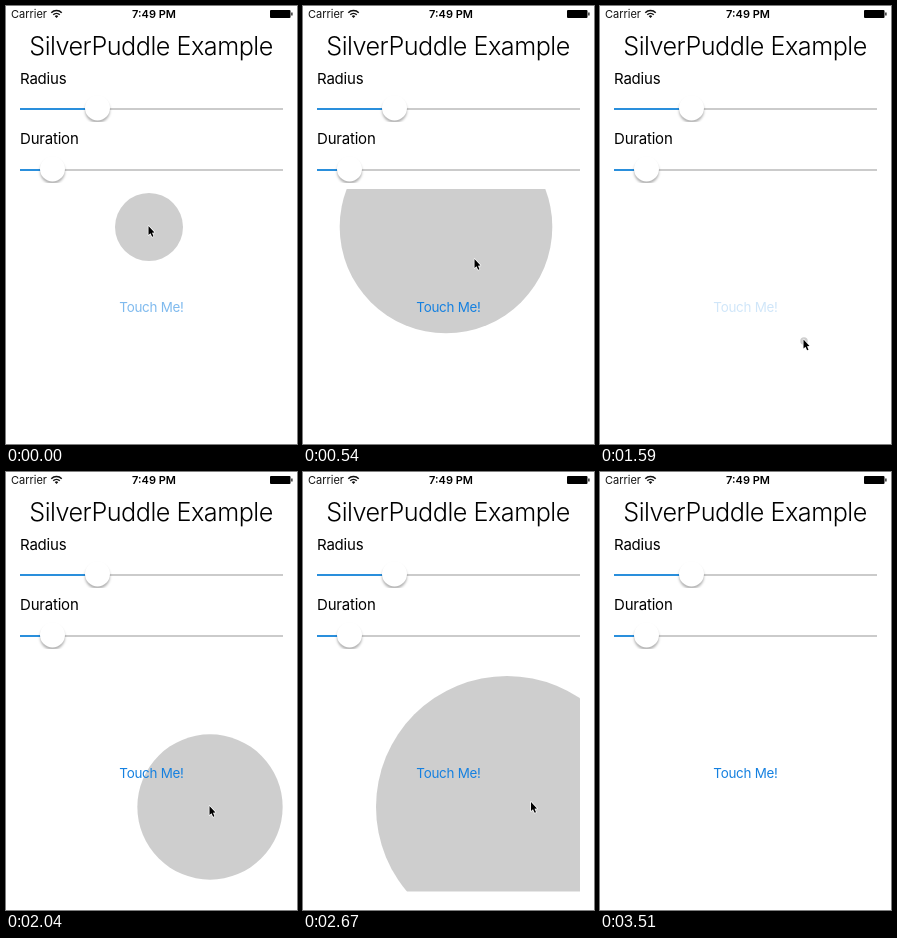
An HTML page with a canvas for the animation above (4.08 s loop, 291 px wide and 438 px high).

```html
<!DOCTYPE html>
<html lang="en">
<head>
<meta charset="utf-8">
<title>Ripple demo</title>
<style>
  html, body { margin: 0; width: 100%; height: 100%; overflow: hidden; background: #fff; }
  canvas { display: block; width: 291px; height: 438px; }
</style>
</head>
<body>
<canvas id="stage"></canvas>
<script>
const W = 291, H = 438, LOOP = 4080;
const canvas = document.getElementById('stage');
const ctx = canvas.getContext('2d');
const dpr = window.devicePixelRatio || 1;
canvas.width = W * dpr;
canvas.height = H * dpr;

const FONT = 'Inter, "Liberation Sans", sans-serif';
const GROW = 1070, MAX_R = 131;
const ripples = [
  { x: 143, y: 221, start: -208, fade: 835, end: 1025 },
  { x: 204, y: 335, start: 1568, fade: 2668, end: 2865 }
];

// time, x, y of the pointer tip
const pointerPath = [
  [0, 142.5, 220], [270, 146, 223], [540, 171.5, 253], [930, 201, 324],
  [1080, 203.5, 333], [2040, 203.5, 334], [2460, 205, 334],
  [2670, 228, 330], [2880, 292, 322]
];

const clamp = v => Math.max(0, Math.min(1, v));

function text(str, x, y, size, { color = '#000', align = 'left', weight = 400, spacing = 0 } = {}) {
  ctx.font = `${weight} ${size}px ${FONT}`;
  ctx.letterSpacing = spacing + 'px';
  ctx.textAlign = align;
  ctx.fillStyle = color;
  ctx.fillText(str, x, y);
}

function disc(x, y, r) {
  ctx.beginPath();
  ctx.arc(x, y, r, 0, Math.PI * 2);
  ctx.fill();
}

function wifi(x, y) {
  ctx.strokeStyle = ctx.fillStyle = '#111';
  ctx.lineWidth = 1.5;
  for (const r of [4.6, 7.4]) {
    ctx.beginPath();
    ctx.arc(x, y, r, -Math.PI * 0.75, -Math.PI * 0.25);
    ctx.stroke();
  }
  ctx.beginPath();
  ctx.moveTo(x, y);
  ctx.arc(x, y, 2.5, -Math.PI * 0.75, -Math.PI * 0.25);
  ctx.fill();
}

function statusBar() {
  text('Carrier', 5, 12.3, 11, { color: '#111' });
  wifi(50.5, 12);
  text('7:49 PM', 148, 12.3, 11, { align: 'center', weight: 600 });
  ctx.fillStyle = '#000';
  ctx.beginPath();
  ctx.roundRect(264, 4, 20.5, 8, 1);
  ctx.fill();
  ctx.fillRect(285.3, 6.5, 1.2, 3);
}

function slider(y, knob) {
  ctx.fillStyle = '#cbcbcb';
  ctx.fillRect(14, y, 263, 2);
  ctx.fillStyle = '#2a8fdc';
  ctx.fillRect(14, y, knob - 14, 2);
  ctx.save();
  ctx.beginPath();
  ctx.rect(0, y - 14, W, 28);
  ctx.clip();
  ctx.shadowColor = 'rgba(0,0,0,.3)';
  ctx.shadowBlur = 2.5 * dpr;
  ctx.shadowOffsetY = 2.5 * dpr;
  ctx.fillStyle = '#fff';
  disc(knob, y, 12.5);
  ctx.restore();
}

function ripple({ x, y, start, fade, end }, t) {
  if (t < start || t >= end) return;
  const r = MAX_R * (1 - (1 - clamp((t - start) / GROW)) ** 1.39);
  ctx.save();
  ctx.beginPath();
  ctx.rect(14, 183, 263, 236.5);
  ctx.clip();
  ctx.globalAlpha = 1 - clamp((t - fade) / (end - fade));
  ctx.fillStyle = '#cecece';
  disc(x, y, r);
  ctx.restore();
}

function button(t) {
  // the label dims on each touch, then recovers
  const touch = ripples.findLast(r => r.start <= t).start;
  ctx.globalAlpha = 0.2 + 0.8 * clamp((t - touch - 40) / 390);
  text('Touch Me!', 145.5, 306.4, 13.4, { color: '#1580e0', align: 'center', spacing: -0.25 });
  ctx.globalAlpha = 1;
}

function pointer(t) {
  const i = pointerPath.findIndex(p => p[0] > t);
  if (i < 1) return;
  const [t0, x0, y0] = pointerPath[i - 1];
  const [t1, x1, y1] = pointerPath[i];
  const k = (t - t0) / (t1 - t0);
  ctx.save();
  ctx.translate(x0 + (x1 - x0) * k, y0 + (y1 - y0) * k);
  ctx.lineJoin = 'round';
  ctx.lineWidth = 1.4;
  ctx.strokeStyle = '#fff';
  ctx.fillStyle = '#000';
  const arrow = new Path2D('M0 0V9L2 7.3L3.6 10.8L5 10.2L3.5 6.8L6 6.5Z');
  ctx.stroke(arrow);
  ctx.fill(arrow);
  ctx.restore();
}

function draw(t) {
  ctx.setTransform(dpr, 0, 0, dpr, 0, 0);
  ctx.fillStyle = '#fff';
  ctx.fillRect(0, 0, W, H);
  statusBar();
  text('SilverPuddle Example', 145, 49, 25.2, { align: 'center', weight: 300, spacing: -0.5 });
  text('Radius', 14, 77.5, 15, { spacing: -0.2 });
  slider(102, 91.5);
  text('Duration', 14, 138, 15, { spacing: -0.2 });
  slider(163, 46.5);
  ripples.forEach(r => ripple(r, t));
  button(t);
  pointer(t);
}

const origin = performance.now();
function tick() {
  const t = (performance.now() - origin) % LOOP;
  draw(Math.floor(t / 30) * 30);
  requestAnimationFrame(tick);
}
tick();
</script>
</body>
</html>
```
